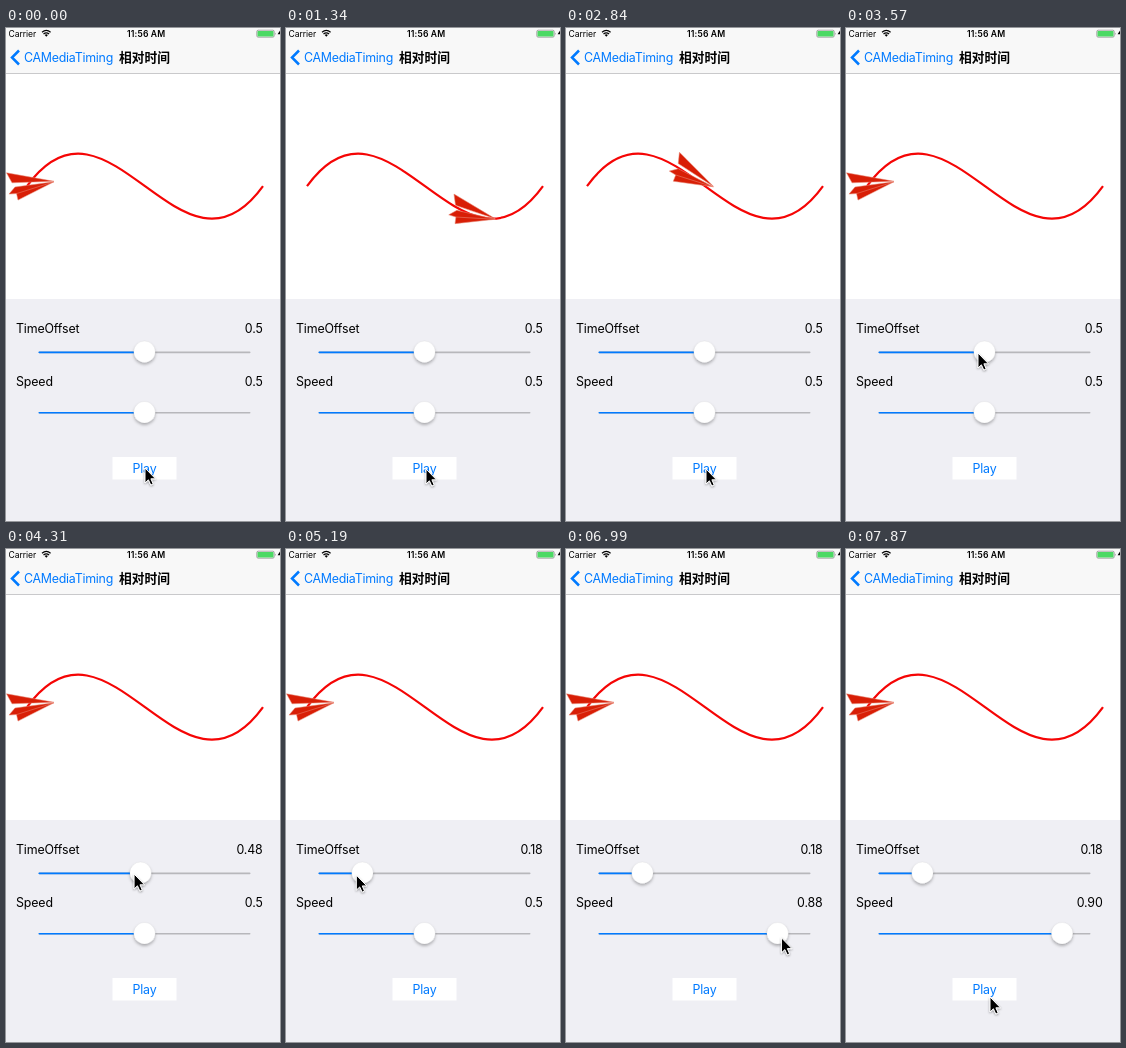
An HTML page that plays this animation: 274x493 px, repeating every 8000 ms.

```html
<!DOCTYPE html>
<html lang="zh-CN">
<head>
<meta charset="utf-8">
<title>Relative time</title>
<style>
  html, body { margin: 0; width: 100%; height: 100%; overflow: hidden; background: #fff; }
  svg { display: block; width: 100%; height: 100%; }
  text { font: 12.4px Inter, "Liberation Sans", sans-serif; letter-spacing: -.14px; }
  .nav { letter-spacing: -.25px; }
  .status { font-size: 8.6px; letter-spacing: -.05px; }
  .bold { font-weight: 600; letter-spacing: .15px; }
  .title { font: 700 12.75px "Noto Sans CJK SC", "Noto Sans CJK", sans-serif; letter-spacing: 0; }
  .end { text-anchor: end; }
  .mid { text-anchor: middle; }
  .blue { fill: #007aff; }
</style>
</head>
<body>
<svg viewBox="0 0 274 493">
  <defs>
    <filter id="shadow" x="-50%" y="-50%" width="200%" height="200%">
      <feDropShadow dx="0" dy="2" stdDeviation="1.6" flood-opacity=".28"/>
    </filter>
    <filter id="soft" x="-50%" y="-50%" width="200%" height="200%">
      <feDropShadow dx="0" dy="1" stdDeviation=".9" flood-opacity=".4"/>
    </filter>
  </defs>

  <rect width="274" height="493" fill="#efeff4"/>
  <rect width="274" height="271" fill="#fff"/>
  <rect width="274" height="45" fill="#f8f8f8"/>
  <rect y="45" width="274" height="1" fill="#c9c9cb"/>

  <text class="status" x="2.5" y="8.8">Carrier</text>
  <g fill="none" stroke="#000" stroke-width="1.2">
    <path d="M36 4.2Q40.3 .6 44.6 4.2M37.5 6Q40.3 3.6 43.1 6"/>
    <path d="M38.7 6.9Q40.3 5.7 41.9 6.9L40.3 8.8Z" fill="#000" stroke="none"/>
  </g>
  <text class="status bold mid" x="140.2" y="8.8">11:56 AM</text>
  <rect x="250.8" y="2.2" width="17.4" height="7" rx="1.4" fill="none" stroke="#555" stroke-width=".5"/>
  <rect x="251.5" y="2.9" width="16" height="5.6" rx=".7" fill="#4cd964"/>
  <path d="M269 4.4q1 1.3 0 2.6z" fill="#555"/>
  <path d="M274 2.4L271.6 6.2H274Z"/>

  <path d="M13 22.5L6 29.5L13 36.5" fill="none" stroke="#007aff" stroke-width="2.5"/>
  <text class="blue nav" x="18" y="34">CAMediaTiming</text>
  <text class="title" x="113" y="34.3">相对时间</text>

  <path id="curve" fill="none" stroke="#f50505" stroke-width="2.2"/>
  <g id="plane" fill="#d81e06" stroke="#e98a78" stroke-width=".5" stroke-linejoin="round">
    <path d="M-23.5-13L24-4.5L-18-3Z"/>
    <path d="M24-4L-15 1.2L-21 8.3L-13.5 7.8L-12 14.3Z"/>
    <path d="M24-4L-13.5 7.8"/>
  </g>

  <text x="10" y="305">TimeOffset</text>
  <text x="10" y="358.2">Speed</text>
  <g id="sliders"></g>

  <rect x="106.5" y="429" width="64" height="22.5" fill="#fff"/>
  <text class="blue mid" x="138.5" y="444.5">Play</text>

  <g id="cursor" filter="url(#soft)">
    <path d="M0 0V15L3.4 11.8L5.8 17L8.2 16L5.9 10.8H10.5Z" stroke="#fff" stroke-linejoin="round"/>
  </g>
</svg>
<script>
// The screen refreshes once per TICK, counted from START
const LOOP = 8000, START = 750, TICK = 148.33;
const FLIGHT = 945, FLIGHT_MS = 2000;

// Cubic track: both handles reach BEND of the width, LIFT up and down
const X = 21, Y = 158.2, W = 236, LIFT = 112.7, BEND = .345;

// Pointer moves in ticks; drags carry a slider value along
const rest = { x: 139, y: 440, offset: .5, speed: .5 };
const moves = [
  { from: -1, to: 0, x: 140, y: 441 },
  { from: 14, to: 15, x: 138, y: 350 },
  { from: 15, to: 17, x: 132, y: 325 },
  { from: 23, to: 27, x: 69, offset: .18 },
  { from: 28, to: 34, x: 141, y: 386 },
  { from: 34, to: 36, x: 147, speed: .53 },
  { from: 39, to: 43, x: 220, y: 389, speed: .9 },
  { from: 45, to: 48, x: 144, y: 448 }
];
const sliders = [
  { key: 'offset', y: 324.4, label: 305, touch: 20 },
  { key: 'speed', y: 384.8, label: 358.2, touch: 35 }
];

const $ = id => document.getElementById(id);
const clamp = v => Math.min(1, Math.max(0, v));
const ease = f => f < .5 ? 4 * f ** 3 : 1 - 4 * (1 - f) ** 3;
const place = (el, x, y, angle = 0) =>
  el.setAttribute('transform', `translate(${x} ${y}) rotate(${angle})`);

function add(parent, tag, attrs) {
  const el = document.createElementNS('http://www.w3.org/2000/svg', tag);
  for (const k in attrs) el.setAttribute(k, attrs[k]);
  return parent.appendChild(el);
}

for (const s of sliders) {
  const bar = { x: 32.5, y: s.y - .8, width: 212, height: 1.6, rx: .8 };
  add($('sliders'), 'rect', { ...bar, fill: '#b7b7bb' });
  s.fill = add($('sliders'), 'rect', { ...bar, class: 'blue' });
  s.thumb = add($('sliders'), 'circle', {
    cy: s.y - .6, r: 10.7, fill: '#fff', stroke: '#000',
    'stroke-opacity': .1, 'stroke-width': .4, filter: 'url(#shadow)'
  });
  s.text = add($('sliders'), 'text', { x: 256.6, y: s.label, class: 'end' });
}

$('curve').setAttribute('d',
  `M${X} ${Y}C${X + W * BEND} ${Y - LIFT} ${X + W * (1 - BEND)} ${Y + LIFT} ${X + W} ${Y}`);

function pointAt(p) {
  const a = 3 * p * (1 - p) ** 2, b = 3 * p * p * (1 - p);
  return [X + W * (a * BEND + b * (1 - BEND) + p ** 3), Y + LIFT * (b - a)];
}

function drawPlane(time) {
  const run = (time - FLIGHT) / FLIGHT_MS;
  if (run < 0 || run >= 1) return place($('plane'), 24, 157.8);
  // The time offset starts the flight halfway, then it wraps
  const p = (run + .5) % 1, d = .001;
  const [x, y] = pointAt(p), [x0, y0] = pointAt(p - d), [x1, y1] = pointAt(p + d);
  place($('plane'), x, y, Math.atan2(y1 - y0, x1 - x0) * 180 / Math.PI);
}

function stateAt(n) {
  const state = { ...rest };
  for (const { from, to, ...goal } of moves) {
    const f = ease(clamp((n - from) / (to - from)));
    for (const k in goal) state[k] += (goal[k] - state[k]) * f;
  }
  return state;
}

function draw(ms) {
  const n = Math.max(-1, Math.floor((ms - START + 5) / TICK));
  const state = stateAt(n);
  drawPlane(START + n * TICK);
  for (const s of sliders) {
    const v = state[s.key], cx = 41.5 + 194 * v;
    s.thumb.setAttribute('cx', cx);
    s.fill.setAttribute('width', cx - 32.5);
    s.text.textContent = n < s.touch ? '0.5' : v.toFixed(2);
  }
  place($('cursor'), state.x, state.y);
}

const t0 = performance.now();
function loop() {
  draw((performance.now() - t0) % LOOP);
  requestAnimationFrame(loop);
}
loop();
</script>
</body>
</html>
```
